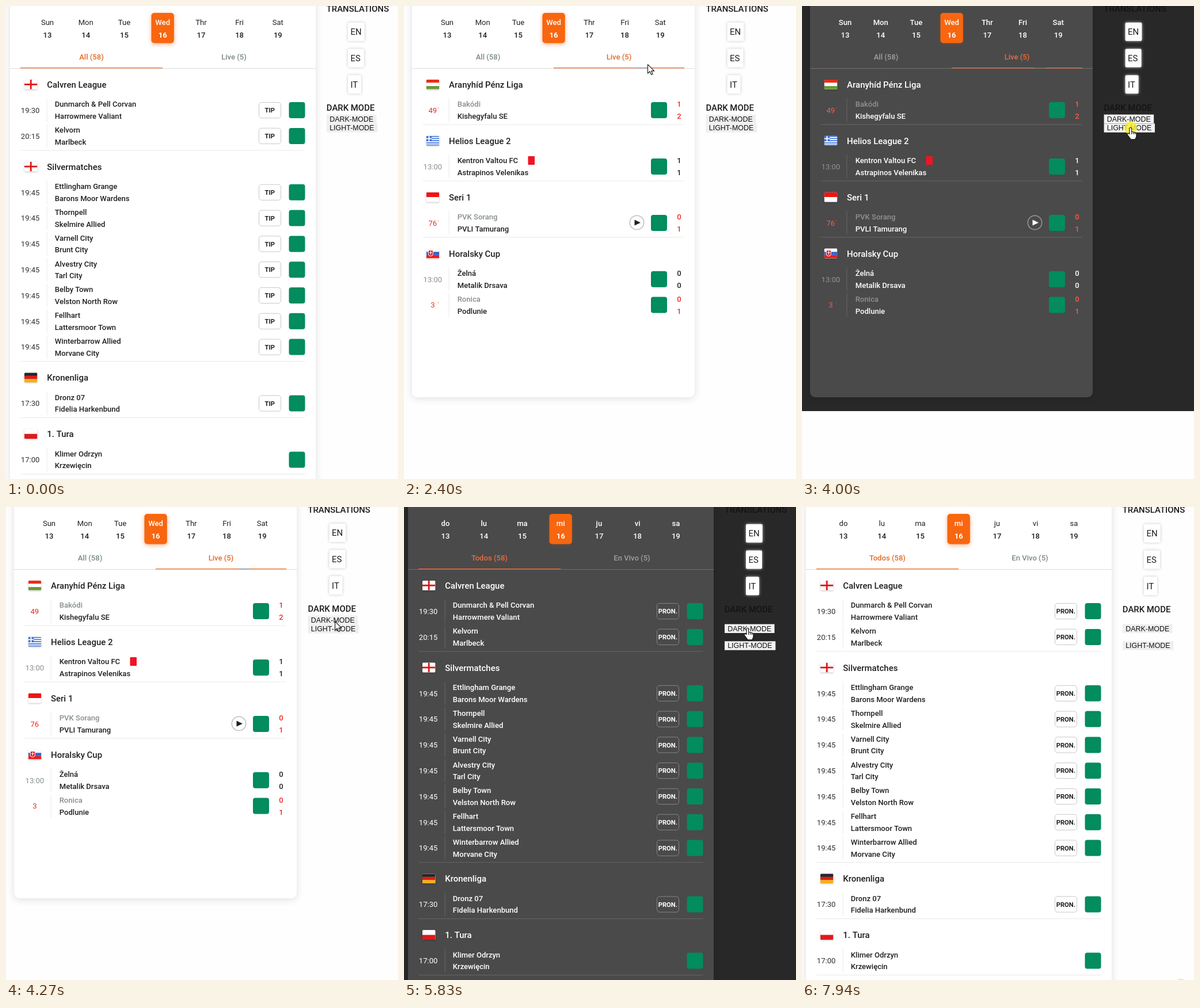
Write an HTML page with a canvas that moves like this. It is 681 px wide and 822 px high and loops after 8.01 s.

```html
<!DOCTYPE html>
<html lang="en">
<head>
<meta charset="utf-8">
<title>Match list</title>
<style>
html, body { margin: 0; width: 100%; height: 100%; overflow: hidden; background: #fefefe; }
canvas { display: block; }
</style>
</head>
<body>
<canvas id="stage" width="681" height="822"></canvas>
<script>
const ctx = document.getElementById('stage').getContext('2d');
const LOOP = 8010, TICK = 1000 / 15;
const SMALL = 13.07, BIG = 14.93, ROW = 44.8;

const LIGHT = {
  page: '#fefefe', panel: '#ffffff', text: '#202020', time: '#303030', muted: '#87908b',
  line: '#e9e9e9', edge: '#dcdcdc', tip: '#c8c8c8', tab: '#7b8b84', active: '#e56a24',
  red: '#ee2a20', side: '#1c1c1c', gap: '#7d8ca6', button: '#efefef', ring: '#bdbdbd',
  glow: 'rgba(0,0,0,.22)', today: 'rgba(248,102,16,.5)'
};
const DARK = {
  page: '#282828', panel: '#4a4a4a', text: '#ffffff', time: '#ffffff', muted: '#929292',
  line: '#666666', edge: '#707070', tip: '#858585', tab: '#a0a0a0', active: '#f4683a',
  red: '#fa5c42', side: '#141414', gap: '#707070', button: '#f2f2f2', ring: '#9a9a9a',
  glow: 'rgba(255,255,255,.65)', today: 'rgba(248,102,16,.15)'
};

const EN = { days: ['Sun', 'Mon', 'Tue', 'Wed', 'Thr', 'Fri', 'Sat'], tabs: ['All (58)', 'Live (5)'], tip: 'TIP', drop: 0, modes: [196.3, 212] };
const ES = { days: ['do', 'lu', 'ma', 'mi', 'ju', 'vi', 'sa'], tabs: ['Todos (58)', 'En Vivo (5)'], tip: 'PRON.', drop: 1, modes: [211.3, 241] };

const ALL = {
  left: 7, right: 538, bottom: 860, pad: 18.6, day0: 72, dayStep: 66.72, tabX: [148.5, 396], bar: [25, 272], side: 556.8,
  timeX: 42.1, teamX: 84.8, logoX: 491.5,
  groups: [
    { flag: 'cross', name: 'Calvren League', rows: [
      ['19:30', 'Dunmarch & Pell Corvan', 'Harrowmere Valiant'],
      ['20:15', 'Kelvorn', 'Marlbeck']] },
    { flag: 'cross', name: 'Silvermatches', rows: [
      ['19:45', 'Ettlingham Grange', 'Barons Moor Wardens'],
      ['19:45', 'Thornpell', 'Skelmire Allied'],
      ['19:45', 'Varnell City', 'Brunt City'],
      ['19:45', 'Alvestry City', 'Tarl City'],
      ['19:45', 'Belby Town', 'Velston North Row'],
      ['19:45', 'Fellhart', 'Lattersmoor Town'],
      ['19:45', 'Winterbarrow Allied', 'Morvane City']] },
    { flag: ['#262626', '#dd1f10', '#f5b015'], name: 'Kronenliga', rows: [
      ['17:30', 'Dronz 07', 'Fidelia Harkenbund']] },
    { flag: ['#ffffff', '#e01a1a'], name: '1. Tura', noTip: true, rows: [
      ['17:00', 'Klimer Odrzyn', 'Krzewięcin']] }
  ]
};
// Live rows: time, teams, scores, running, extra
const LIVE = {
  left: 14, right: 505, bottom: 680, pad: 18.4, day0: 75, dayStep: 61.7, tabX: [146, 373.5], bar: [260, 487], side: 524.4,
  timeX: 49.8, teamX: 92.7, logoX: 429,
  groups: [
    { flag: ['#ea2c18', '#ffffff', '#6a9838'], name: 'Aranyhíd Pénz Liga', rows: [
      ['49', 'Bakódi', 'Kishegyfalu SE', 1, 2, true]] },
    { flag: 'stripes', name: 'Helios League 2', rows: [
      ['13:00', 'Kentron Valtou FC', 'Astrapinos Velenikas', 1, 1, false, 'card']] },
    { flag: ['#ee1414', '#ffffff'], name: 'Seri 1', rows: [
      ['76', 'PVK Sorang', 'PVLI Tamurang', 0, 1, true, 'play']] },
    { flag: 'shield', name: 'Horalsky Cup', rows: [
      ['13:00', 'Želná', 'Metalik Drsava', 0, 0, false],
      ['3', 'Ronica', 'Podlunie', 0, 1, true]] }
  ]
};

const HAND = new Path2D('M-2 10.5V1a1.8 1.8 0 0 1 3.6 0v6.2c.6-1.2 2.8-.9 3.1.5.8-.9 2.6-.6 2.8.8 1-.6 2.4 0 2.4 1.4v4.6c0 1.8-1.5 2.8-1.5 4.2V19.8H-.5v-1.3c-1.5-1.9-3.8-4.3-5.3-7.2-.7-1.4 1-2.6 2.2-1.5z');
const ARROW = new Path2D('M0 0V15.5l3.7-3.5 2.5 5.7 2.5-1.1-2.4-5.4h4.9z');

// Pointer legs: start, end, x, y reached
const LEGS = [
  [0, 0, 633, 860], [67, 530, 617, 44], [1060, 1330, 405.5, 96], [1530, 1670, 405.5, 91],
  [2260, 2930, 565, 186], [3070, 3330, 569, 194], [3530, 3930, 571, 212],
  [4130, 4800, 577, 91], [5200, 5530, 597, 211], [5960, 6370, 595, 238], [7240, 7930, 658, 831]
];
const ARROW_TIMES = [[0, 460], [1120, 1270], [2390, 2860], [4270, 4720], [5070, 5460], [7330, 8010]];
const CLICKS = [[1930, 2135], [3400, 3530], [4000, 4130], [4870, 5065], [5530, 5700], [6440, 6765], [7930, 8010]];
const DARK_TIMES = [[3530, 4130], [5700, 6695]];
const within = (spans, t) => spans.some(([a, b]) => t >= a && t < b);

function text(s, x, cy, size, weight, color, align = 'left', face = 'Roboto') {
  ctx.font = `${weight} ${size}px ${face}, sans-serif`;
  ctx.textAlign = align;
  ctx.fillStyle = color;
  ctx.fillText(s, x, cy + size * 0.356);
}
function rect(x, y, w, h, color) {
  ctx.fillStyle = color;
  ctx.fillRect(x, y, w, h);
}
function box(x, y, w, h, r, fill, stroke) {
  ctx.beginPath();
  ctx.roundRect(x, y, w, h, r);
  if (fill) { ctx.fillStyle = fill; ctx.fill(); }
  if (stroke) { ctx.strokeStyle = stroke; ctx.lineWidth = 1; ctx.stroke(); }
}
function shadowBox(x, y, w, h, r, fill, shade, blur, dy = 0) {
  ctx.save();
  ctx.shadowColor = shade;
  ctx.shadowBlur = blur;
  ctx.shadowOffsetY = dy;
  box(x, y, w, h, r, fill);
  ctx.restore();
}

function flag(kind, x, cy) {
  const w = 22.4, h = 16.8, y = cy - h / 2;
  shadowBox(x, y, w, h, 1.5, '#fff', 'rgba(0,0,0,.25)', 3, 1);
  ctx.save();
  ctx.beginPath();
  ctx.roundRect(x, y, w, h, 1.5);
  ctx.clip();
  const bands = list => list.forEach((c, i) => rect(x, y + i * h / list.length, w, h / list.length, c));
  if (kind === 'cross') {
    rect(x, cy - 1.4, w, 2.8, '#dd1616');
    rect(x + w / 2 - 1.4, y, 2.8, h, '#dd1616');
  } else if (kind === 'stripes') {
    const blue = '#3b6fd8', s = h / 9;
    bands(Array.from({ length: 9 }, (_, i) => i % 2 ? '#fff' : blue));
    rect(x, y, s * 5, s * 5, blue);
    rect(x, y + s * 2, s * 5, s, '#fff');
    rect(x + s * 2, y, s, s * 5, '#fff');
  } else if (kind === 'shield') {
    bands(['#fff', '#2f66d0', '#ee1c1c']);
    box(x + 3.5, y + 3, 8, 10, [1, 1, 4, 4], '#e01c24', '#fff');
    rect(x + 7, y + 4.5, 1.2, 6, '#fff');
    rect(x + 5.4, y + 6.3, 4.4, 1.1, '#fff');
  } else bands(kind);
  ctx.restore();
}

function header(v, lang, c, tab) {
  lang.days.forEach((d, i) => {
    const x = v.day0 + i * v.dayStep, on = i === 3;
    if (on) shadowBox(x - 19.7, 12, 39.4, 52.4, 5, '#f86610', c.today, 7, 2);
    const color = on ? '#fff' : c.text;
    text(d, x, 28.2, SMALL, on || c === DARK ? 500 : 400, color, 'center');
    text(13 + i, x, 50.3, SMALL, on ? 700 : 500, color, 'center');
  });
  lang.tabs.forEach((s, i) => text(s, v.tabX[i], 88, SMALL, 500, i === tab ? c.active : c.tab, 'center'));
  rect(v.left, 108, v.right - v.left, 1, c.edge);
  const mark = (x, w, color) => rect(x, 107, w, 1.2, color);
  mark(v.bar[0], v.bar[1] - v.bar[0], c.active);
  if (tab) mark(403, 21, c.gap);
}

function playIcon(x, y, c) {
  ctx.beginPath();
  ctx.arc(x, y, 12.2, 0, 7);
  ctx.strokeStyle = c.ring;
  ctx.lineWidth = 1.5;
  ctx.stroke();
  ctx.beginPath();
  ctx.moveTo(x - 4, y - 5);
  ctx.lineTo(x + 6.5, y);
  ctx.lineTo(x - 4, y + 5);
  ctx.fillStyle = c.text;
  ctx.fill();
}

function match(v, g, r, y, c, lang, live, tick) {
  const [time, home, away, s1, s2, running, extra] = r;
  text(time, v.timeX, y + 0.2, SMALL, 400, live ? (running ? c.red : c.muted) : c.time, 'center');
  if (running && tick) {
    ctx.globalAlpha = 0.5;
    text("'", 58.5, y, SMALL, 400, c.red);
    ctx.globalAlpha = 1;
  }
  rect(v.left + v.pad + 45, y - 20.5, 1, 41, c.line);
  text(home, v.teamX, y - 10.3, SMALL, 500, running ? c.muted : c.text);
  text(away, v.teamX, y + 10.3, SMALL, 500, c.text);
  box(v.logoX, y - 14, 28, 28, 4, '#038c5d');
  if (live) {
    const color = running ? c.red : c.text;
    text(s1, 478, y - 10.3, SMALL, 500, color, 'center');
    text(s2, 478, y + 10.3, SMALL, 500, color, 'center');
  } else if (!g.noTip) {
    box(439.5, y - 13.6, 38, 27.2, 4.5, null, c.tip);
    text(lang.tip, 458.3, y + 0.2, 11.2, 700, c.text, 'center');
  }
  if (extra === 'card') box(215.5, y - 18, 11.5, 15, 1, '#f01424');
  if (extra === 'play') playIcon(404.5, y - 0.5, c);
}

function list(v, c, lang, live, tick) {
  const x0 = v.left + v.pad, x1 = v.right - v.pad;
  let y = 136.3;
  v.groups.forEach((g, i) => {
    flag(g.flag, x0 + 6.4, y);
    text(g.name, x0 + 45.7, y + 0.2, BIG, 500, c.text);
    for (const r of g.rows) match(v, g, r, y += ROW, c, lang, live, tick);
    y += 25;
    if (!live || i < v.groups.length - 1) rect(x0, y - 0.5, x1 - x0, 1, c.line);
    y += 28.1;
  });
}

function sidebar(x, lang, c) {
  text('TRANSLATIONS', x, 4.3, BIG, 500, c.side);
  [['EN', 28.8], ['ES', 28], ['IT', 23]].forEach(([s, w], i) => {
    const cy = 44.7 + i * 45.8 + lang.drop;
    shadowBox(x + 37.2, cy - 16, w, 32, 2, '#fff', c.glow, 5);
    text(s, x + 41.7, cy, BIG, 400, '#1c1c1c');
  });
  text('DARK MODE', x, 177 + lang.drop, BIG, 500, c.side);
  [['DARK-MODE', 86.6], ['LIGHT-MODE', 88.4]].forEach(([s, w], i) => {
    const cy = lang.modes[i];
    rect(x + 0.2, cy - 7.7, w, 15.4, c.button);
    text(s, x + 5.4, cy, 12.44, 400, '#111', 'left', '"Liberation Sans"');
  });
}

function pointer(t) {
  const q = Math.floor((t + 5) / TICK) * TICK;
  let [, , x, y] = LEGS[0];
  for (const [a, b, nx, ny] of LEGS.slice(1)) {
    if (q < a) break;
    const k = Math.min(1, (q - a) / (b - a)), e = k * k * (3 - 2 * k);
    x += (nx - x) * e;
    y += (ny - y) * e;
  }
  if (within(CLICKS, t)) {
    ctx.beginPath();
    ctx.arc(x, y, 11, 0, 7);
    ctx.fillStyle = 'rgba(250,238,40,.8)';
    ctx.fill();
  }
  const shape = within(ARROW_TIMES, t) ? ARROW : HAND;
  ctx.save();
  ctx.translate(x, y);
  ctx.fillStyle = '#fff';
  ctx.strokeStyle = '#111';
  ctx.lineWidth = 1.1;
  ctx.lineJoin = 'round';
  ctx.fill(shape);
  ctx.stroke(shape);
  if (shape === HAND) {
    ctx.beginPath();
    for (const fx of [1.6, 4.7, 7.5]) {
      ctx.moveTo(fx, 7.5);
      ctx.lineTo(fx, 11);
    }
    ctx.stroke();
  }
  ctx.restore();
}

function draw(t) {
  const live = t >= 2095 && t < 5065;
  const lang = t < 5065 ? EN : ES, v = live ? LIVE : ALL;
  const c = within(DARK_TIMES, t) ? DARK : LIGHT;
  rect(0, 0, 681, 822, LIGHT.page);
  rect(0, 0, 681, live ? 704 : 822, c.page);
  shadowBox(v.left, -30, v.right - v.left, v.bottom + 30, 9, c.panel, 'rgba(0,0,0,.13)', 14, 2);
  header(v, lang, c, live ? 1 : 0);
  list(v, c, lang, live, t % 1200 < 500);
  sidebar(v.side, lang, c);
  pointer(t);
}

const start = performance.now();
function frame() {
  draw((performance.now() - start) % LOOP);
  requestAnimationFrame(frame);
}
frame();
</script>
</body>
</html>
```
